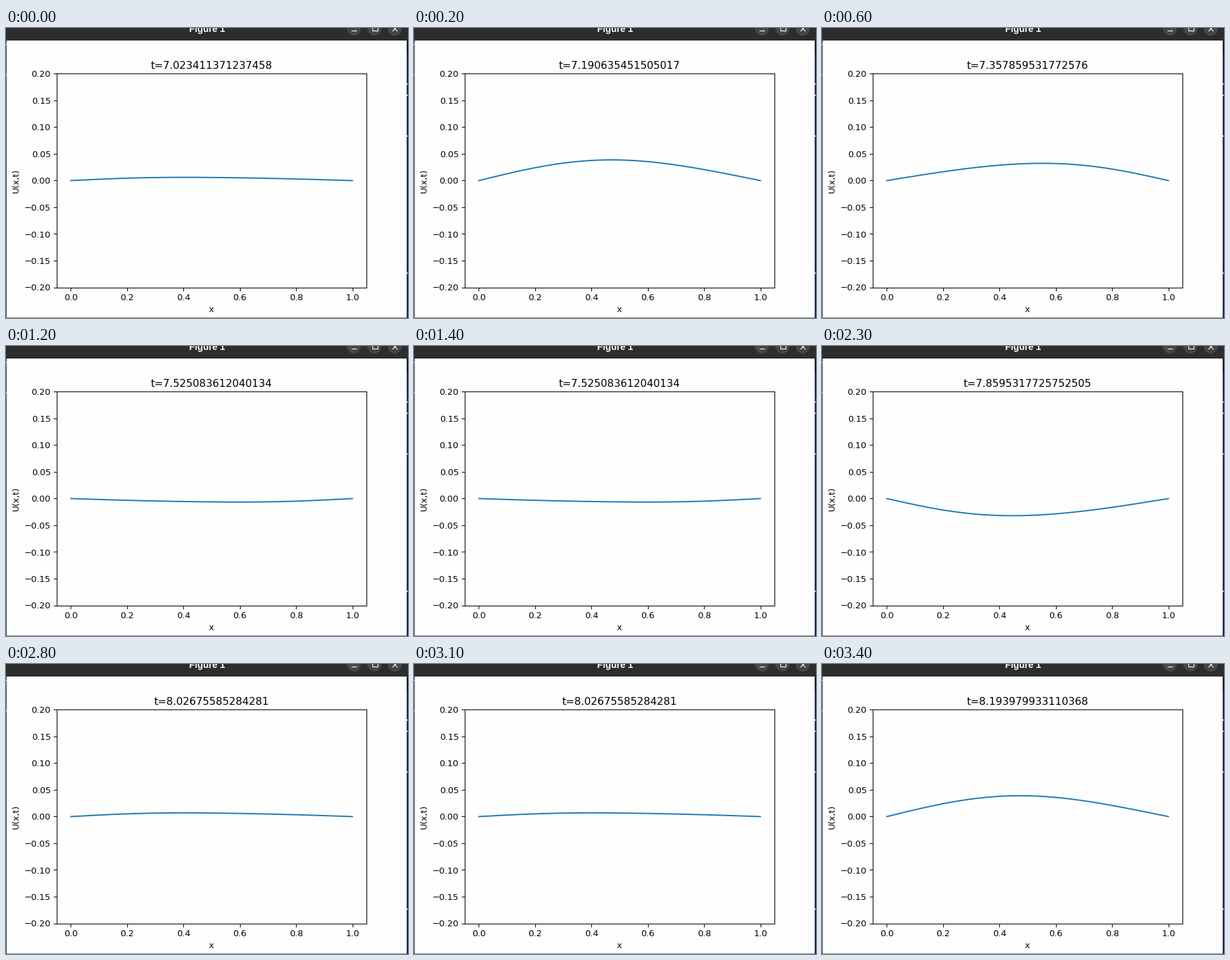
Recreate the animation shown at these times as a matplotlib script. Size 610 px wide and 440 px high, loop 3900 ms.

```python
import numpy as np
import matplotlib.pyplot as plt
from matplotlib.animation import FuncAnimation
from matplotlib.patches import Circle, Rectangle

W, H, DPI = 610, 440, 100
S = 0.9476                       # scale of the plot window on the stage
CHANGES = (1, 6, 12, 17, 22, 28, 33)
FIRST = 42

plt.rcParams.update({
    "font.family": "DejaVu Sans",
    "font.size": 10 * S,
    "axes.titlesize": 12 * S,
    "axes.titlepad": 6 * S,
    "axes.labelpad": 4 * S,
    "axes.linewidth": 0.8 * S,
    "lines.linewidth": 1.5 * S,
})
for side in "xy":
    plt.rcParams.update({
        f"{side}tick.major.size": 3.5 * S,
        f"{side}tick.major.width": 0.8 * S,
        f"{side}tick.major.pad": 3.5 * S,
    })

fig = plt.figure(figsize=(W / DPI, H / DPI), dpi=DPI, facecolor="#fefefe")

# Window frame, in stage pixels with y pointing down
win = fig.add_axes([0, 0, 1, 1])
win.set(xlim=(0, W), ylim=(H, 0))
win.axis("off")


def box(x, y, w, h, color):
    win.add_patch(Rectangle((x, y), w, h, fc=color, ec="none"))


def stroke(xs, ys):
    win.plot(xs, ys, color="#f2f2f2", lw=0.9, solid_capstyle="butt")


box(0, 19, 1, H - 19, "#3c3c3c")
box(0, 439, W, 1, "#8a8a8a")
box(608, 19, 2, 21, "#1c1c20")
box(608, 40, 2, H - 40, "#1b2c52")
for y in (84, 101, 163, 371):
    box(608, y, 2, 2, "#a9b2c4")
for y in (24, 70):
    box(0, y, 1, 2, "#d0d0d0")
box(0, 0, W, 19, "#2d2d2d")
win.text(305, 6, "Figure 1", color="white", size=10, weight="bold",
         family="Liberation Sans", ha="center", va="baseline")
for cx in (528, 559, 590):
    win.add_patch(Circle((cx, 1), 10.5, fc="#464646", ec="none"))
stroke([524, 532], [4.5, 4.5])
stroke([555.5, 563.5, 563.5, 555.5, 555.5], [-3.5, -3.5, 4.5, 4.5, -3.5])
stroke([586.5, 594], [-2.5, 5])
stroke([586.5, 594], [5, -2.5])

# Plot
ax = fig.add_axes([77 / W, 1 - 393.5 / H, 470 / W, 324 / H])
ax.set(ylim=(-0.2, 0.2), xlabel="x", ylabel="U(x,t)", facecolor="none")
x = np.linspace(0, 1, 200)
line, = ax.plot(x, 0 * x, color="#1f77b4")
title = ax.set_title("")


def wave(t):
    """Fixed string with wave speed 2, started from rest position."""
    modes = enumerate((0.0412, 0.0027, 0.0005), 1)
    return sum(a * np.sin(n * np.pi * x) * np.sin(2 * n * np.pi * t)
               for n, a in modes)


def draw(frame):
    k = FIRST + sum(frame >= c for c in CHANGES)
    t = 50 * k / 299
    line.set_ydata(wave(t))
    title.set_text(f"t={t}")
    return line, title


anim = FuncAnimation(fig, draw, frames=39, interval=100, repeat=True,
                     repeat_delay=0)
plt.show()
```
